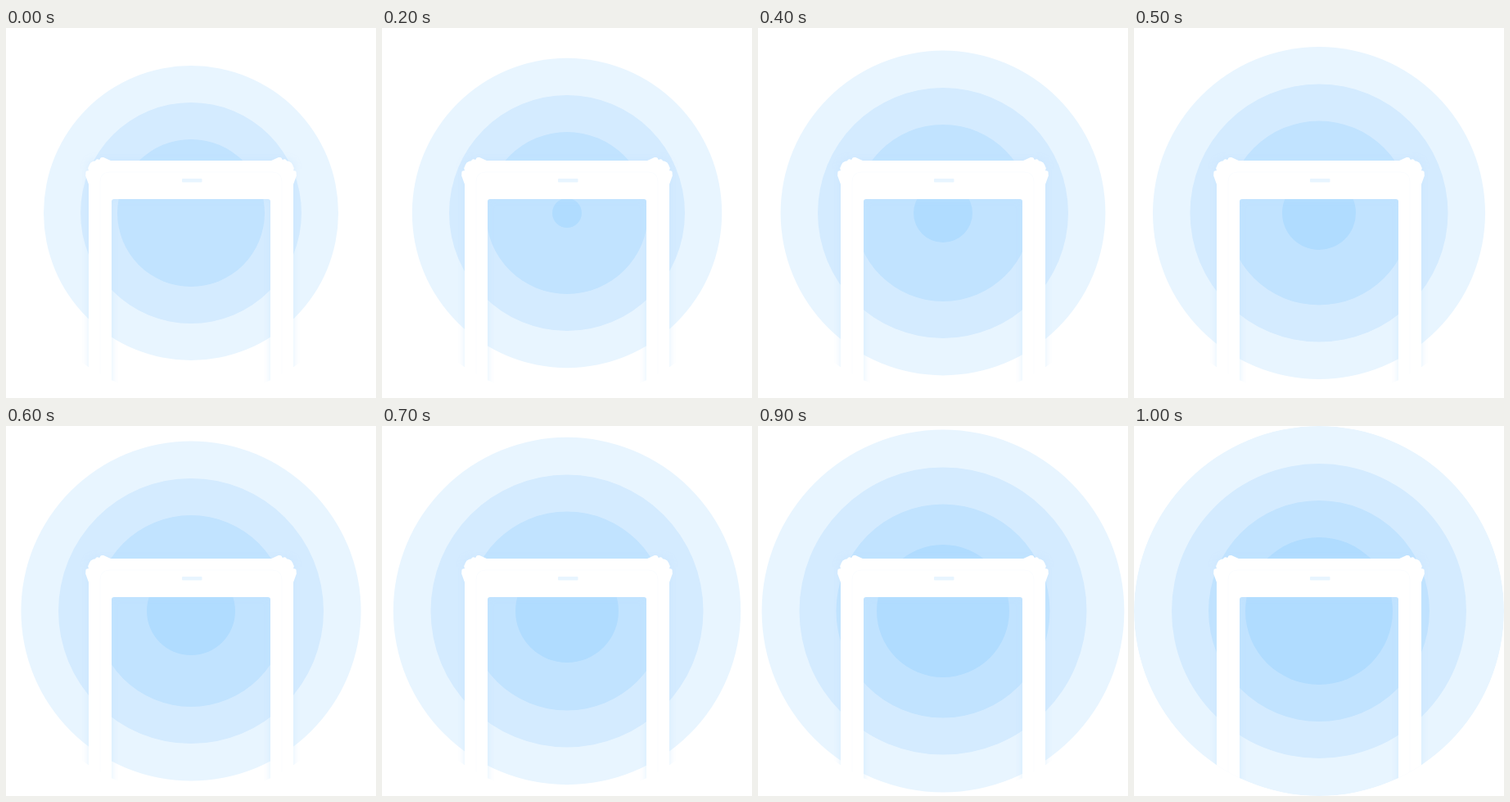
An HTML page that plays this animation: 452x452 px, repeating every 1400 ms.

```html
<!DOCTYPE html>
<html lang="en">
<head>
<meta charset="utf-8">
<title>Phone pulse</title>
<style>
  html, body { margin: 0; width: 100%; height: 100%; overflow: hidden; background: #fff; }
  svg { display: block; width: 100vw; height: 100vh; }
  .case { filter: drop-shadow(0 0 4.5px rgba(193, 227, 255, .5)); }
</style>
</head>
<body>
<svg viewBox="0 0 452 452">
  <clipPath id="disc"><circle cx="226" cy="226" r="226"/></clipPath>
  <g clip-path="url(#disc)">
    <g id="rings">
      <circle cx="226" cy="226" fill="#e8f5ff"/>
      <circle cx="226" cy="226" fill="#d4ebff"/>
      <circle cx="226" cy="226" fill="#c1e3ff"/>
      <circle cx="226" cy="226" fill="#b0dcff"/>
    </g>
    <path class="case" fill="#fff" fill-rule="evenodd"
      d="M101 480V172Q101 162 111 162H341Q351 162 351 172V480ZM129 480V212Q129 209 132 209H320Q323 209 323 212V480Z"/>
    <!-- ridged corner bumper, mirrored on the right -->
    <g id="bumper" fill="#fff">
      <path d="M101 191L97 180L98 177L116 159L119 158L129 162.5V180H101Z"/>
      <path d="M100 177L103 171.5L107.500 166.500L112.500 162.500L118 160.500" fill="none"
        stroke="#fff" stroke-width="5.400" stroke-linecap="round" stroke-dasharray="0 6.200"/>
    </g>
    <use href="#bumper" transform="matrix(-1 0 0 1 452 0)"/>
    <path d="M115 480V188Q115 176 127 176H325Q337 176 337 188V480" fill="none" stroke="#fbfdff"/>
    <rect x="215" y="184" width="24.500" height="4.500" rx="1" fill="#e8f5ff"/>
  </g>
</svg>
<script>
  const LOOP = 1400, STEP = 100, LAST = 10;
  const rings = document.querySelectorAll('#rings circle');
  // start and end radius, outermost ring first
  const radii = [[180, 226], [135, 180], [90, 135], [0, 90]];

  function draw(now) {
    const step = Math.min(LAST, Math.floor(now % LOOP / STEP));
    radii.forEach(([from, to], i) =>
      rings[i].setAttribute('r', from + (to - from) * step / LAST));
    requestAnimationFrame(() => draw(performance.now() - start));
  }

  const start = performance.now();
  draw(0);
</script>
</body>
</html>
```
